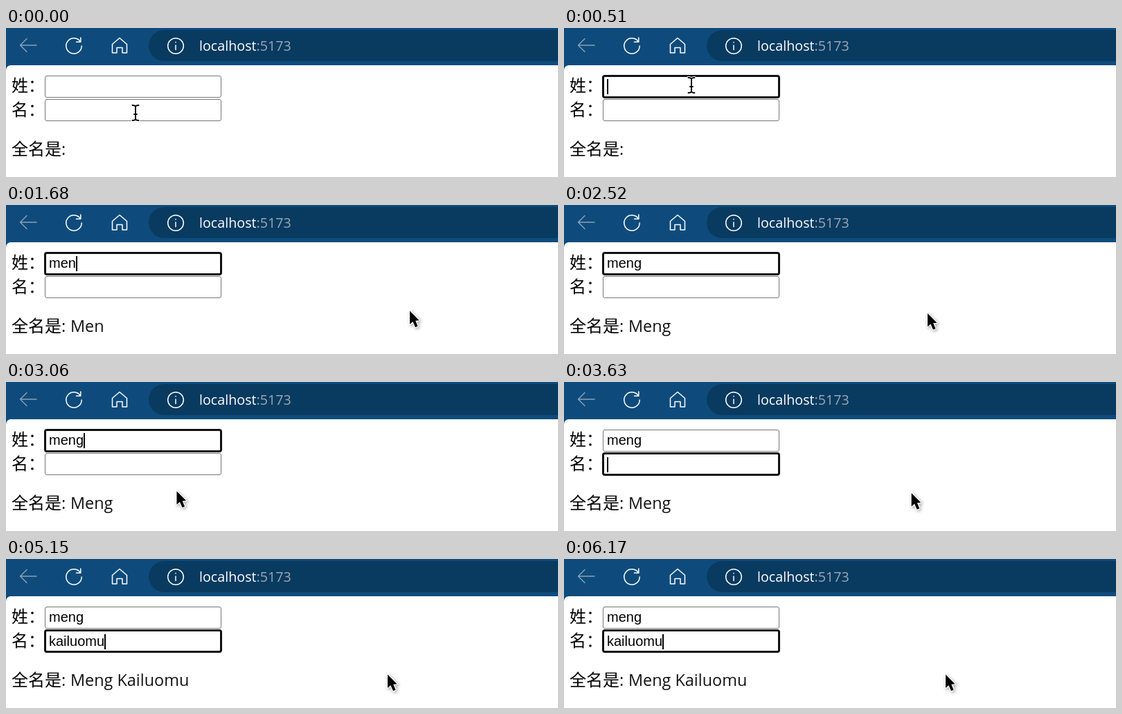
Write an HTML page with a canvas that moves like this. It is 797x216 px and loops after 6.22 s.

```html
<!DOCTYPE html>
<html lang="zh-CN">
<head>
<meta charset="utf-8">
<title>全名</title>
<style>
html, body { margin: 0; width: 100%; height: 100%; overflow: hidden; background: #fff; }
canvas { display: block; width: 797px; height: 216px; }
</style>
</head>
<body>
<canvas id="stage"></canvas>
<script>
const W = 797, H = 216, LOOP = 6220, BLINK = 505;
const canvas = document.getElementById('stage');
const ctx = canvas.getContext('2d');
const ratio = window.devicePixelRatio || 1;
canvas.width = W * ratio;
canvas.height = H * ratio;

const CJK = '350 24px "Noto Sans CJK SC", "Noto Sans CJK", sans-serif';
const LATIN = '23.4px "Open Sans", "Noto Sans", sans-serif';
const URL_FONT = '19.7px "Open Sans", "Noto Sans", sans-serif';
const FIELD = '20px "Liberation Sans", Arial, sans-serif';

// Each burst types four letters at a steady pace.
const fields = [
  { label: '姓：', y: 69, base: 91, focus: 465, text: 'meng',
    bursts: [{ from: 1320, step: 180 }] },
  { label: '名：', y: 103, base: 126, focus: 3365, text: 'kailuomu',
    bursts: [{ from: 4230, step: 100 }, { from: 4800, step: 116 }] }
];
for (const f of fields) {
  f.keys = f.bursts.flatMap(b => [0, 1, 2, 3].map(i => b.from + i * b.step));
}

const home = { x: 187, y: 123 };
const moves = [
  { from: 30, to: 350, x: 184, y: 83 },
  { from: 515, to: 900, x: 583, y: 153 },
  { from: 2360, to: 2450, x: 603, y: 156 },
  { from: 2450, to: 3060, x: 247, y: 158 },
  { from: 3060, to: 3300, x: 184, y: 119 },
  { from: 3460, to: 3730, x: 551, y: 167 }
];

const easeOut = p => 1 - (1 - p) ** 2;

function pointerAt(t) {
  let { x, y } = home;
  for (const m of moves) {
    const k = easeOut(Math.min(1, Math.max(0, (t - m.from) / (m.to - m.from))));
    x += (m.x - x) * k;
    y += (m.y - y) * k;
  }
  return [x, y];
}

const icons = {
  back: new Path2D('M30 15.5L20.5 25L30 34.5M21 25H44'),
  reload: new Path2D('M107.5 20A11.2 11.2 0 1 0 109.2 26M107.8 14V20.2H101.5'),
  home: new Path2D('M153.5 23.5L164 14.5L174.5 23.5V36H168V28.5H160V36H153.5Z'),
  info: new Path2D('M233.7 26a11.3 11.3 0 1 0 22.6 0a11.3 11.3 0 1 0-22.6 0M245 25V31.5M245 20.6V20.9'),
  arrow: new Path2D('M0 .5V20L4.4 16L8 24.3L11.6 22.7L8.2 14.8L13.6 14.3Z'),
  beam: new Path2D('M-4.5-11Q-.5-11 0-9Q.5-11 4.5-11M0-9V9M-4.5 11Q-.5 11 0 9Q.5 11 4.5 11M-2 2H2')
};

function text(str, x, y, font, color) {
  ctx.font = font;
  ctx.fillStyle = color;
  ctx.fillText(str, x, y);
}

function box(x, y, w, h, r) {
  ctx.beginPath();
  ctx.roundRect(x, y, w, h, r);
}

function outline(path, color, width) {
  ctx.strokeStyle = color;
  ctx.lineWidth = width;
  if (path) ctx.stroke(path);
  else ctx.stroke();
}

function drawToolbar() {
  ctx.fillStyle = '#0e4b7c';
  ctx.fillRect(0, 0, W, 64);
  ctx.fillStyle = '#093a60';
  box(206, 3, 640, 45, 22.5);
  ctx.fill();
  ctx.fillStyle = '#fff';
  box(0, 54, W, H, [7, 0, 0, 0]);
  ctx.fill();

  ctx.lineCap = ctx.lineJoin = 'round';
  outline(icons.back, '#8aa3b8', 1.4);
  for (const name of ['reload', 'home', 'info']) outline(icons[name], '#fff', 1.5);

  text('localhost', 279, 33, URL_FONT, '#fff');
  text(':5173', 279 + ctx.measureText('localhost').width, 33, URL_FONT, '#9aa7b3');
}

function typed(field, t) {
  return field.text.slice(0, field.keys.filter(k => k <= t).length);
}

function drawField(field, t, focused) {
  const { y, base } = field, value = typed(field, t);
  text(field.label, 8, base + 1, CJK, '#000');
  box(56.5, y + 0.5, 254, 31, 2.5);
  outline(null, focused ? '#101010' : '#767676', focused ? 3 : 1);
  text(value, 62, base, FIELD, '#000');
  if (!focused) return;
  const last = Math.max(field.focus, ...field.keys.filter(k => k <= t));
  if (Math.floor((t - last) / BLINK) % 2 === 0) {
    ctx.fillRect(Math.round(62 + ctx.measureText(value).width), base - 17, 2, 22);
  }
}

function drawResult(t) {
  const names = fields.map(f => typed(f, t))
    .map(s => s.charAt(0).toUpperCase() + s.slice(1));
  text('全名是', 8, 184, CJK, '#000');
  text(':', 80, 184, LATIN, '#111');
  text(names.join(' '), 93, 184, LATIN, '#111');
}

function drawBeam() {
  outline(icons.beam, '#fff', 4);
  outline(icons.beam, '#000', 1.8);
}

function drawArrow() {
  ctx.shadowColor = 'rgba(0,0,0,0.4)';
  ctx.shadowBlur = 4 * ratio;
  ctx.shadowOffsetX = ctx.shadowOffsetY = 1.5 * ratio;
  outline(icons.arrow, '#fff', 2.4);
  ctx.shadowColor = 'transparent';
  ctx.fillStyle = '#000';
  ctx.fill(icons.arrow);
}

function drawPointer(t) {
  const [x, y] = pointerAt(t);
  const inField = x > 56 && x < 311 && y > 69 && y < 135;
  ctx.save();
  ctx.translate(x, y);
  if (inField) drawBeam();
  else drawArrow();
  ctx.restore();
}

function draw(t) {
  ctx.setTransform(ratio, 0, 0, ratio, 0, 0);
  ctx.fillStyle = '#fff';
  ctx.fillRect(0, 0, W, H);
  drawToolbar();
  const [first, second] = fields;
  drawField(first, t, t >= first.focus && t < second.focus);
  drawField(second, t, t >= second.focus);
  drawResult(t);
  drawPointer(t);
}

const start = performance.now();
function tick() {
  draw((performance.now() - start) % LOOP);
  requestAnimationFrame(tick);
}
tick();
</script>
</body>
</html>
```
